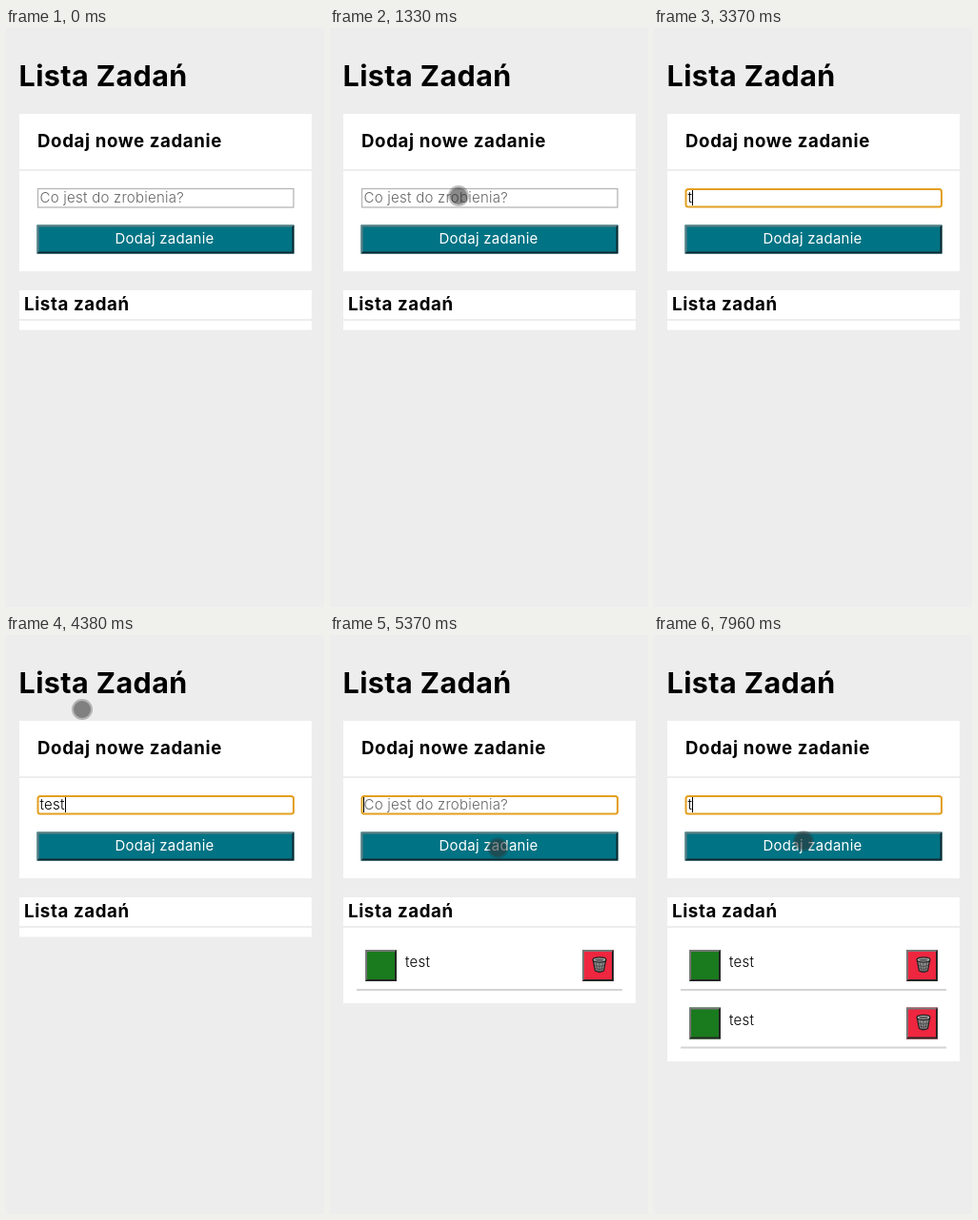
An HTML page for the animation above (8 s loop, 334 by 607 pixels).

```html
<!DOCTYPE html>
<html lang="pl">
<head>
<meta charset="utf-8">
<title>Lista Zadań</title>
<style>
html, body { margin: 0; width: 100%; height: 100%; overflow: hidden; background: #ededed; }
svg { display: block; }
text { font: 15px Inter, "Open Sans", sans-serif; letter-spacing: .25px; fill: #000; }
.h2 { font-size: 18.7px; font-weight: 700; letter-spacing: .6px; }
.h1 { font-size: 30.5px; font-weight: 700; letter-spacing: .4px; }
.light { font-weight: 300; }
</style>
</head>
<body>
<svg width="334" height="607" viewBox="0 0 334 607">
  <defs>
    <g id="box">
      <path d="M0 0H33L31 2H2V31L0 33Z" fill="#767676"/>
      <path d="M33 33V0L31 2V31H2L0 33Z" fill="#252525"/>
    </g>
    <g id="bin" stroke-linejoin="round">
      <path d="M1.5 4.5L3.5 15Q8 17.5 12.5 15L14.5 4.5Z" fill="#8e8e8e" stroke="#222" stroke-width="1.3"/>
      <path d="M4.5 7L6 15M8 7V16M11.5 7L10 15M3 9.5Q8 11.5 13 9.5M3.5 12.5Q8 14.5 12.5 12.5" fill="none" stroke="#444" stroke-width=".8"/>
      <ellipse cx="8" cy="3.5" rx="7" ry="2.6" fill="#b5b5b5" stroke="#222" stroke-width="1.3"/>
      <ellipse cx="8" cy="3.7" rx="4.6" ry="1.1" fill="#555"/>
    </g>
    <g id="task">
      <path d="M37 330h33v33h-33z" fill="#1a7a1e"/>
      <use href="#box" x="37" y="330"/>
      <text class="light" x="79" y="348">test</text>
      <path d="M265 330h33v33h-33z" fill="#ee263f"/>
      <use href="#box" x="265" y="330"/>
      <use href="#bin" x="275" y="337"/>
      <path d="M28 371h279v2h-279z" fill="#d4d4d4"/>
    </g>
  </defs>

  <text class="h1" x="13.5" y="61">Lista Zadań</text>

  <path d="M14 90h307v165h-307z" fill="#fff"/>
  <path d="M14 148h307v2h-307z" fill="#ededed"/>
  <text class="h2" x="33" y="125">Dodaj nowe zadanie</text>
  <rect id="field" fill="#fff"/>
  <text id="hint" class="light" x="35.5" y="183" style="fill:#666">Co jest do zrobienia?</text>
  <text id="typed" class="light" x="35.5" y="183"></text>
  <path id="caret" d="M0 170v16" stroke="#000"/>
  <g transform="translate(32.5 206.5)">
    <path d="M0 0h270v30h-270z" fill="#007384"/>
    <path d="M0 0h270l-2 2h-266v26l-2 2z" fill="#5f7e82"/>
    <path d="M270 30v-30l-2 2v26h-266l-2 2z" fill="#10292f"/>
  </g>
  <text x="114.5" y="226" style="fill:#fff">Dodaj zadanie</text>

  <rect id="list" x="14" y="275" width="307" fill="#fff"/>
  <path d="M14 305h307v2h-307z" fill="#ededed"/>
  <text class="h2" x="19" y="296">Lista zadań</text>
  <use id="task1" href="#task"/>
  <use id="task2" href="#task" y="60.5"/>

  <g id="cursor">
    <circle id="halo"/>
    <circle id="dot" r="9"/>
  </g>
</svg>
<script>
const $ = id => document.getElementById(id);
const set = (id, attrs) => { for (const k in attrs) $(id).setAttribute(k, attrs[k]); };
const show = (id, on) => set(id, { visibility: on ? "visible" : "hidden" });
const between = (t, a, b) => t >= a && t < b;

// Pointer moves: start, end, steps, from, to, ease power
const moves = [
  [790, 1330, 9, [297, 585], [135, 176], 1.6],
  [2250, 2580, 5, [150, 176], [346, 196], 1],
  [4100, 4240, 3, [314, 168], [61, 54], 1],
  [4380, 4700, 6, [80, 78], [184, 236], 1.4],
  [4770, 4770, 1, [183, 220], [183, 220], 1],
  [5240, 5510, 4, [186, 227], [157, 216], 1]
];
const away = [[0, 790], [2580, 4100]];

// Field contents over time
const typing = [
  [0, ""], [3370, "t"], [3440, "te"], [3700, "tes"], [3840, "test"], [4980, ""],
  [5900, "t"], [6040, "te"], [6240, "tes"], [6370, "test"], [7030, ""], [7960, "t"]
];

function pointer(t) {
  const [start, end, steps, from, to, power] = moves.findLast(m => t >= m[0]) || moves[0];
  let p = 1;
  if (t < end) p = Math.floor((t - start) / (end - start) * (steps - 1) + 1e-6) / (steps - 1);
  const e = 1 - (1 - Math.max(p, 0)) ** power;
  return from.map((v, i) => v + (to[i] - v) * e);
}

function draw(t) {
  const focus = t >= 1660;
  set("field", focus
    ? { x: 33.5, y: 169, width: 268.5, height: 18.5, rx: 2.5, stroke: "#e2a021", "stroke-width": 2 }
    : { x: 33.5, y: 168.5, width: 268.5, height: 19.5, rx: 0, stroke: "#b5b5b5", "stroke-width": 1.3 });

  const text = typing.findLast(k => t >= k[0])[1];
  $("typed").textContent = text;
  show("hint", !text);
  show("caret", focus);
  const width = text ? $("typed").getComputedTextLength() : 0;
  set("caret", { transform: `translate(${Math.round(35.4 + width) + .5} 0)` });

  const count = (t >= 4980) + (t >= 7030);
  set("list", { height: [41.5, 111, 172][count] });
  show("task1", count > 0);
  show("task2", count > 1);

  const press = between(t, 1660, 1720) || between(t, 4910, 4980);
  show("cursor", !away.some(a => between(t, ...a)));
  set("cursor", { transform: `translate(${pointer(t)})` });
  set("halo", { r: press ? 12 : 11, fill: press ? "rgba(205,185,0,.65)" : "rgba(50,50,50,.3)" });
  set("dot", { fill: press ? "none" : "rgba(50,50,50,.4)" });
}

function frame() {
  draw(performance.now() % 8000);
  requestAnimationFrame(frame);
}
frame();
</script>
</body>
</html>
```
